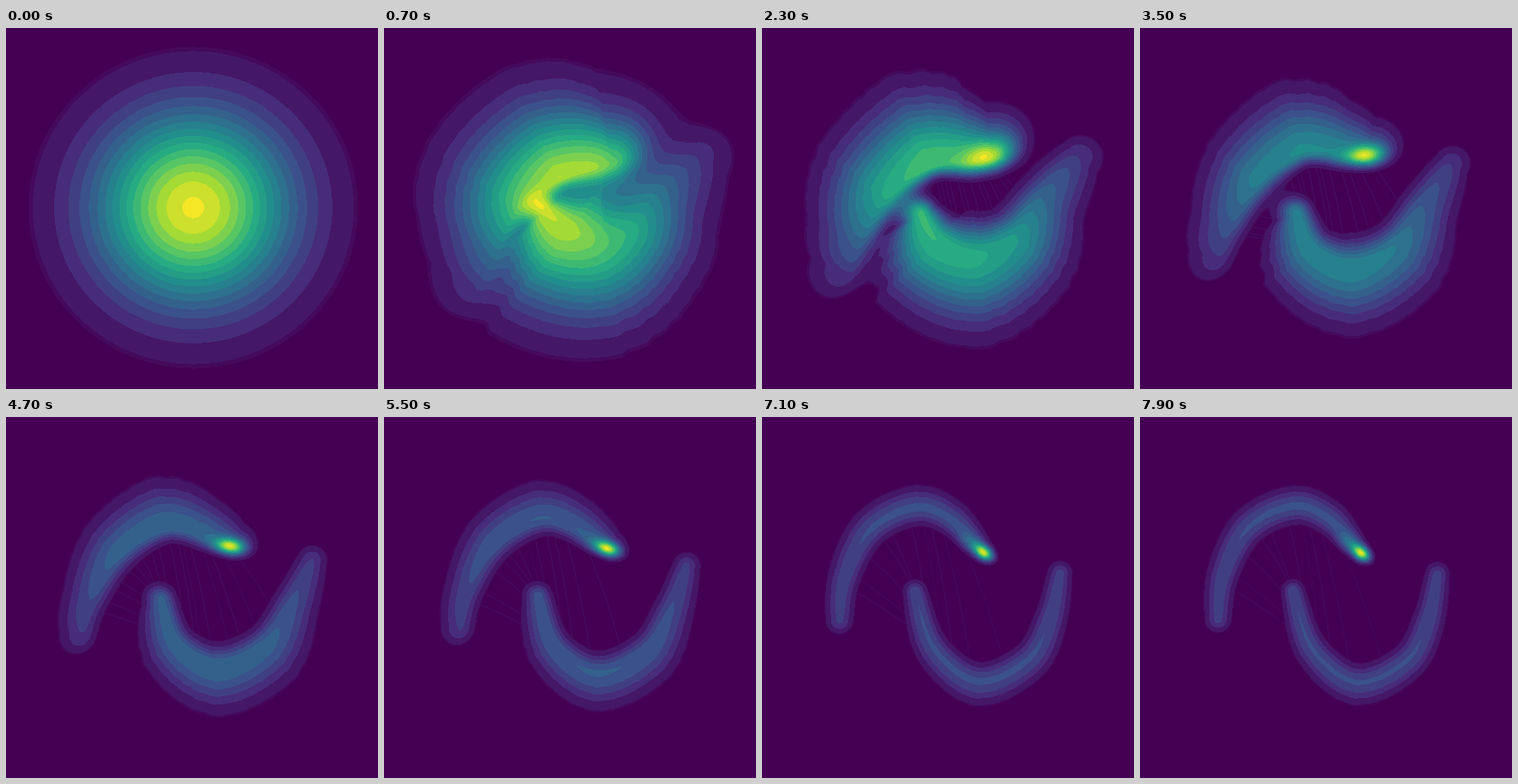
These frames come from a looping animation (441x428 px, 8 s). An HTML page with a canvas:

```html
<!DOCTYPE html>
<html lang="en">
<head>
<meta charset="utf-8">
<title>Density flow</title>
<style>
  html, body { margin: 0; width: 100%; height: 100%; overflow: hidden; background: rgb(68,1,84); }
  canvas { display: block; width: 441px; height: 428px; }
</style>
</head>
<body>
<canvas id="stage" width="441" height="428"></canvas>
<script>
const W = 441, H = 428, LOOP = 8000, TICK = 100;
const CELL = 2, GW = Math.ceil(W / CELL) + 1, GH = Math.ceil(H / CELL) + 1;
const BAND = 0.0617, FAINT = 0.053, SEGS = 25;

const ctx = document.getElementById('stage').getContext('2d');
const layer = document.createElement('canvas');
layer.width = W;
layer.height = H;
const layerCtx = layer.getContext('2d');
const image = layerCtx.createImageData(W, H);
const field = new Float32Array(GW * GH);

// Three poses per arc; each node is x, y, outer spread, inner spread, height.
const upper = {
  side: 1,
  poses: [
    [[108,302,34,14,.2], [128,262,46,11,.42], [155,210,54,13,.8], [205,174,57,9,1], [250,162,46,13,.97], [272,157,34,13,.85]],
    [[92,272,24,12,.17], [103,238,27,13,.27], [137,182,36,13,.45], [190,146,42,10,.5], [238,148,32,10,.48], [272,152,24,9,.38]],
    [[92,239,10,10,.22], [98,188,12,11,.25], [128,131,14,12,.27], [183,105,14,13,.28], [227,123,13,11,.28], [262,161,7,7,.25]]
  ]
};
const lower = {
  side: -1,
  poses: [
    [[190,216,16,11,.97], [215,245,56,28,.9], [258,262,55,36,.8], [300,240,42,24,.7], [332,195,34,20,.42], [378,148,24,18,.2]],
    [[186,219,15,11,.46], [204,262,34,15,.47], [250,283,40,20,.48], [302,258,36,16,.43], [336,208,25,15,.3], [368,160,15,13,.18]],
    [[181,206,8.5,8.5,.26], [203,273,13,11,.27], [256,314,16,13,.27], [316,288,14,12,.27], [341,240,12,11,.26], [352,186,9,9,.23]]
  ]
};

const clamp = (v, a, b) => Math.min(b, Math.max(a, v));
const smooth = v => { v = clamp(v, 0, 1); return v * v * (3 - 2 * v); };

// Parabola through values at progress .24, .62 and 1.
function blend(a, b, c, p) {
  const k = (p - 0.24) / 0.38;
  return a * (k - 1) * (k - 2) / 2 - b * k * (k - 2) + c * k * (k - 1) / 2;
}

function spline(a, b, c, d, t) {
  return b + 0.5 * t * (c - a + t * (2 * a - 5 * b + 4 * c - d + t * (3 * (b - c) + d - a)));
}

// Point on a node chain, u from 0 to 1.
function along(nodes, u) {
  const last = nodes.length - 1;
  const i = Math.min(last - 1, Math.floor(u * last)), t = u * last - i;
  const a = nodes[Math.max(0, i - 1)], b = nodes[i], c = nodes[i + 1], d = nodes[Math.min(last, i + 2)];
  return b.map((v, n) => n < 2 ? spline(a[n], v, c[n], d[n], t) : v + (c[n] - v) * t);
}

function pose(arc, p) {
  const [a, b, c] = arc.poses;
  return a.map((node, i) => node.map((v, n) => blend(v, b[i][n], c[i][n], p)));
}

function addArc(nodes, side, weight) {
  const segs = [];
  for (let i = 0; i < SEGS; i++) {
    const a = along(nodes, i / SEGS), b = along(nodes, (i + 1) / SEGS);
    const dx = b[0] - a[0], dy = b[1] - a[1], len2 = dx * dx + dy * dy, len = Math.sqrt(len2);
    segs.push({ a, b, x: a[0], y: a[1], dx, dy, len2, nx: side * dy / len, ny: -side * dx / len });
  }
  for (let gy = 0, g = 0; gy < GH; gy++) {
    for (let gx = 0; gx < GW; gx++, g++) {
      const x = gx * CELL, y = gy * CELL;
      let best = 1e9, seg = null, at = 0;
      for (let i = 0; i < SEGS; i++) {
        const s = segs[i], px = x - s.x, py = y - s.y;
        let t = (px * s.dx + py * s.dy) / s.len2;
        t = t < 0 ? 0 : t > 1 ? 1 : t;
        const ex = px - t * s.dx, ey = py - t * s.dy, d2 = ex * ex + ey * ey;
        if (d2 < best) { best = d2; seg = s; at = t; }
      }
      const { a, b } = seg;
      const mix = n => a[n] + (b[n] - a[n]) * at;
      const out = ((x - mix(0)) * seg.nx + (y - mix(1)) * seg.ny) / (Math.sqrt(best) + 1e-6);
      const f = smooth((out + 1) / 2);
      const spread = mix(3) + (mix(2) - mix(3)) * f;
      field[g] += weight * mix(4) * Math.exp(-best / (2 * spread * spread));
    }
  }
}

function addBlob(cx, cy, sx, sy, angle, height) {
  const c = Math.cos(angle), s = Math.sin(angle);
  for (let gy = 0, g = 0; gy < GH; gy++) {
    for (let gx = 0; gx < GW; gx++, g++) {
      const x = gx * CELL - cx, y = gy * CELL - cy;
      const u = (x * c + y * s) / sx, v = (y * c - x * s) / sy;
      field[g] += height * Math.exp(-(u * u + v * v) / 2);
    }
  }
}

const viridis = [
  [68,1,84], [71,45,123], [59,82,139], [44,114,142], [33,144,140],
  [39,173,129], [92,200,99], [170,220,50], [253,231,37]
];
function shade(v) {
  const k = clamp(v, 0, 1) * 8, i = Math.min(7, Math.floor(k));
  return viridis[i].map((c, n) => Math.round(c + (viridis[i + 1][n] - c) * (k - i)));
}
const bands = Array.from({ length: 18 }, (_, k) => shade(k * BAND));
const faint = shade(0.025);

function paintField() {
  let top = 0;
  for (const v of field) if (v > top) top = v;
  const px = image.data;
  for (let y = 0, o = 0; y < H; y++) {
    const gy = Math.floor(y / CELL), fy = y / CELL - gy;
    for (let x = 0; x < W; x++, o += 4) {
      const gx = Math.floor(x / CELL), fx = x / CELL - gx, g = gy * GW + gx;
      const a = field[g] + (field[g + 1] - field[g]) * fx;
      const b = field[g + GW] + (field[g + GW + 1] - field[g + GW]) * fx;
      const v = (a + (b - a) * fy) / top;
      const color = v < BAND ? faint : bands[Math.floor(v / BAND)];
      px[o] = color[0];
      px[o + 1] = color[1];
      px[o + 2] = color[2];
      px[o + 3] = v < FAINT ? 0 : 255;
    }
  }
  layerCtx.putImageData(image, 0, 0);
}

// Thin threads left behind in the gap between the arcs.
function paintThreads(up, low, p) {
  const count = 44;
  ctx.strokeStyle = 'rgb(72,26,108)';
  ctx.lineWidth = 0.9;
  for (let i = 0; i < count; i++) {
    const k = i / (count - 1);
    const keep = (i * 0.618 + 0.3) % 1, limit = p * 0.75 + Math.max(0, k - 0.65) * p;
    const alpha = smooth((keep - limit) * 6 + 0.5) * (1 - 0.45 * p);
    if (alpha <= 0) continue;
    const from = along(up, 0.15 + 0.8 * k);
    const to = along(low, k < 0.35 ? (0.35 - k) * 0.6 : Math.min(0.7, (k - 0.35) * 1.1));
    ctx.globalAlpha = alpha;
    ctx.beginPath();
    ctx.moveTo(from[0], from[1]);
    ctx.quadraticCurveTo((from[0] + to[0]) / 2 + 6, (from[1] + to[1]) / 2 - 6, to[0], to[1]);
    ctx.stroke();
  }
  ctx.globalAlpha = 1;
}

function draw(ms) {
  const p = Math.sin(Math.PI / 2 * Math.pow(ms / 7900, 1.07));
  const q = Math.max(p, 0.2), split = smooth(p / 0.24);
  const up = pose(upper, q), low = pose(lower, q);
  const track = (a, b, c) => blend(a, b, c, q);

  field.fill(0);
  if (split < 1) addBlob(221.5, 212.5, 80.6, 78.6, 0, 1 - split);
  if (split > 0) {
    addArc(up, upper.side, split);
    addArc(low, lower.side, split);
    const x = track(264, 267, 262), y = track(156, 150, 161), angle = track(-0.3, -0.15, 0.65);
    addBlob(x, y, track(22, 14, 8), track(15, 8, 5), angle, split * track(0.12, 0.58, 0.75));
    addBlob(x - 18 * Math.cos(angle), y - 18 * Math.sin(angle), 13, 7, angle,
      split * Math.max(0, track(0, 0.05, 0.2)));
  }
  paintField();

  ctx.fillStyle = 'rgb(68,1,84)';
  ctx.fillRect(0, 0, W, H);
  if (split > 0.8) paintThreads(up, low, p);
  ctx.drawImage(layer, 0, 0);
}

let shown = -1;
function tick() {
  const ms = Math.floor(performance.now() % LOOP / TICK) * TICK;
  if (ms !== shown) {
    shown = ms;
    draw(ms);
  }
  requestAnimationFrame(tick);
}
tick();
</script>
</body>
</html>
```
